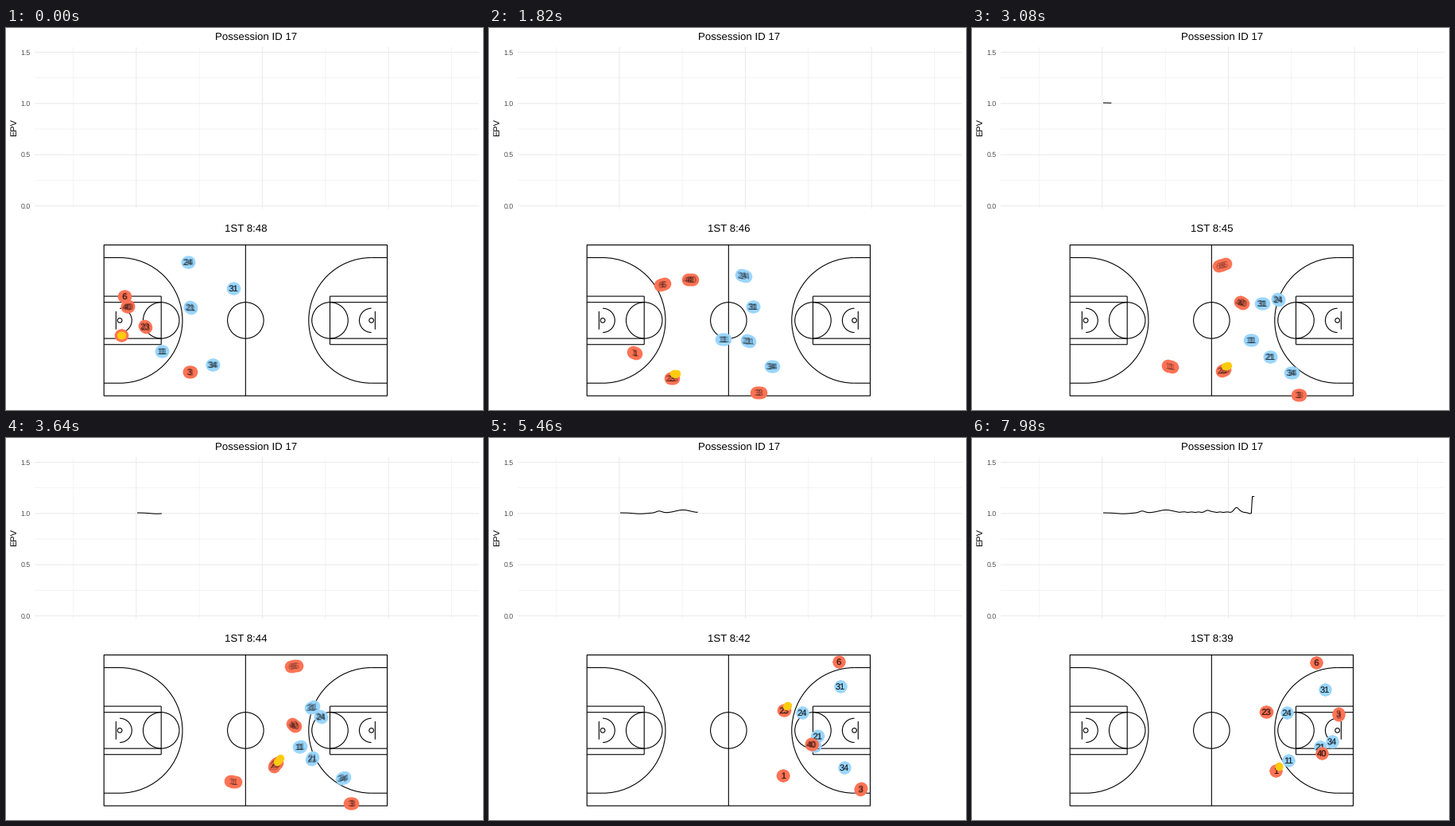
Write a matplotlib script that moves like this. It is 600 px wide and 480 px high and loops after 8 s.

```python
import numpy as np
import matplotlib.pyplot as plt
from matplotlib.animation import FuncAnimation
from matplotlib.patches import Arc, Circle, Rectangle

W, H, DPI = 600, 480, 100
PT = 72 / DPI            # points per pixel
TICK, STEP, LOOP = 40, 140, 8000
COPIES = np.linspace(-0.36, 0.36, 5)   # sub-samples smeared into each step

plt.rcParams.update({"font.family": "Liberation Sans", "path.snap": False,
                     "text.hinting": "none"})
fig = plt.figure(figsize=(W / DPI, H / DPI), dpi=DPI, facecolor="white")
ax = fig.add_axes([0, 0, 1, 1])
ax.set(xlim=(0, W), ylim=(H, 0))
ax.axis("off")


def label(x, y, s, px, **kw):
    kw = {"ha": "center", "va": "baseline", "color": "black", **kw}
    return ax.text(x, y, s, fontsize=px * PT, **kw)


def line(xs, ys, width=1.1, color="black", **kw):
    return ax.plot(xs, ys, color=color, lw=width * PT,
                   solid_capstyle="butt", **kw)[0]


# --- EPV panel ---
for i in range(7):
    x, y = 84.4 + 79.35 * i, 223.5 - 32.17 * i
    line([x, x], [24, 227], 1.07 if i % 2 else 0.53, "#ebebeb", zorder=0)
    line([36, 595], [y, y], 0.53 if i % 2 else 1.07, "#ebebeb", zorder=0)
    if i % 2 == 0:
        label(31, y + 3.2, f"{i / 4:.1f}", 8.8, ha="right", color="#4d4d4d")
label(315, 15.2, "Possession ID 17", 13.2)
label(9.8, 125, "EPV", 11, rotation=90, va="center")
clock = label(301.3, 255.4, "", 13.2)
epv = line([], [], 1.07)


def epv_height(x):
    """Almost flat value with a few bumps and a late jump."""
    y = 94 - 0.8 * (x > 262) + 0.3 * np.sin(x * 0.7) * (x > 262)
    for mid, rise, wide in ((190, -1.2, 12), (214, 2.2, 5), (244, 3.6, 13),
                            (297, 2.4, 4), (333, 6, 4), (349, -2, 3)):
        y = y - rise * np.exp(-((x - mid) / wide) ** 2)
    return np.where(x > 352, 73.5, y)


# --- court, in feet from the baseline and the long axis ---
LEFT, RIGHT, MID = 123.2, 479.5, 367.4
FT = (RIGHT - LEFT) / 94


def arc(x, r, a, b):
    ax.add_patch(Arc((x, MID), 2 * r * FT, 2 * r * FT, theta1=a, theta2=b,
                     lw=1.1 * PT, color="black"))


def ring(x, r):
    ax.add_patch(Circle((x, MID), r * FT, fill=False, lw=1.1 * PT))


def half(base, side):
    def at(ft):
        return base + side * ft * FT

    def along(ft, wide):
        for s in (-1, 1):
            line([base, at(ft)], [MID + s * wide * FT] * 2)

    def across(ft, wide):
        line([at(ft)] * 2, [MID - wide * FT, MID + wide * FT])

    a, b = (-90, 90) if side > 0 else (90, 270)
    along(19, 6)
    along(19, 8)
    along(5.25, 20.8)
    across(19, 8)
    across(4, 3)
    arc(at(5.25), 20.8, a, b)
    arc(at(5.25), 4, a, b)
    ring(at(5.25), 0.75)
    ring(at(19), 6)


ax.add_patch(Rectangle((LEFT, MID - 25 * FT), RIGHT - LEFT, 50 * FT,
                       fill=False, lw=1.15 * PT))
centre = (LEFT + RIGHT) / 2
line([centre, centre], [MID - 25 * FT, MID + 25 * FT])
ring(centre, 6)
half(LEFT, 1)
half(RIGHT, -1)

# --- key positions; None lets a player run straight on to the next one ---
KEYS = (0, 13, 22, 31, 39, 47, 57)
BLUE = {
    11: [(196, 406), (295, 391), (351, 392), (387, 382), None,
         (421, 395), (398, 405)],
    21: [(232, 351), (326, 393), (375, 413), (395, 385), None,
         (428, 370), (438, 388)],
    24: [(229, 294), (320, 311), (385, 341), (402, 356), (394, 345),
         (413, 335), (396, 345)],
    31: [(286, 327), (332, 350), (365, 346), (410, 325), (442, 312),
         None, (444, 316)],
    34: [(260, 423), (356, 425), (402, 433), (442, 417), None,
         (450, 410), (453, 381)],
}
CORAL = {
    1: [(145, 386), (183, 408), None, (325, 435), (370, 424),
        None, (382, 418)],
    3: [(231, 432), (339, 458), (411, 461), (454, 453), None,
        (473, 421), (461, 347)],
    6: [(149, 337), (218, 322), None, (406, 280), (440, 281),
        None, (433, 282)],
    23: [(175, 375), (230, 440), (316, 430), (358, 376), (371, 342),
         (404, 337), (370, 344)],
    40: [(153, 350), (253, 316), (339, 345), (383, 376), None,
         None, (440, 396)],
}


class Path:
    """Monotone cubic through timed points: slows at turns, never overshoots."""

    def __init__(self, points):
        keys = [(t, p) for t, p in zip(KEYS, points) if p]
        self.t = np.array([t for t, _ in keys], float)
        self.p = np.array([p for _, p in keys], float)
        d = np.diff(self.p, axis=0) / np.diff(self.t)[:, None]
        a, b = d[:-1], d[1:]
        same = a * b > 0
        mean = np.where(same, 2 * a * b / np.where(same, a + b, 1), 0)
        self.v = np.vstack([d[0] * 0.5, mean, d[-1] * 0.5])

    def __call__(self, t):
        i = np.clip(np.searchsorted(self.t, t, "right") - 1, 0, len(self.t) - 2)
        h = (self.t[i + 1] - self.t[i])[:, None]
        u = (t - self.t[i])[:, None] / h
        s = u * u * (3 - 2 * u)
        return (self.p[i] * (1 - s) + self.p[i + 1] * s
                + h * u * (1 - u) * (self.v[i] * (1 - u) - self.v[i + 1] * u))


def dots(r, color, z):
    return ax.scatter([], [], s=(2 * r * PT) ** 2, c=color, lw=0, zorder=z)


class Team:
    def __init__(self, tracks, color, z):
        self.paths = {n: Path(p) for n, p in tracks.items()}
        self.dots = dots(7.8, color, z)
        self.names = [label(0, 0, str(n), 11, alpha=0.3, zorder=z + 1)
                      for n in tracks for _ in COPIES]

    def move(self, t):
        pos = np.vstack([path(t) for path in self.paths.values()])
        self.dots.set_offsets(pos)
        for name, (x, y) in zip(self.names, pos):
            name.set_position((x, y + 4))


blue = Team(BLUE, "#9ad6fe", 4)
coral = Team(CORAL, "#ff7355", 6)
ball = dots(4.7, "#ffcb0d", 8)


def ramp(t, start, end):
    return np.clip((t - start) / (end - start), 0, 1)[:, None]


def ball_at(t):
    """Player 1 passes to 23, who dribbles upcourt and passes back."""
    one, guard = coral.paths[1](t), coral.paths[23](t)
    held = ramp(t, 4, 8) - ramp(t, 52, 56.5)
    return one + (guard - one) * held + ramp(t, 0, 8) * (4, -5.5)


def draw(i):
    step = (i * TICK + TICK // 2) // STEP
    t = step + COPIES
    blue.move(t)
    coral.move(t)
    ball.set_offsets(ball_at(t))
    clock.set_text(f"1ST 8:{int(48.74 - 0.16 * step):02d}")
    xs = np.arange(165, 165.3 + 5.14 * (step - 20), 1.285)
    epv.set_data(xs, epv_height(xs))
    return []


anim = FuncAnimation(fig, draw, frames=LOOP // TICK, interval=TICK,
                     repeat=True, repeat_delay=0, blit=False)
plt.show()
```
